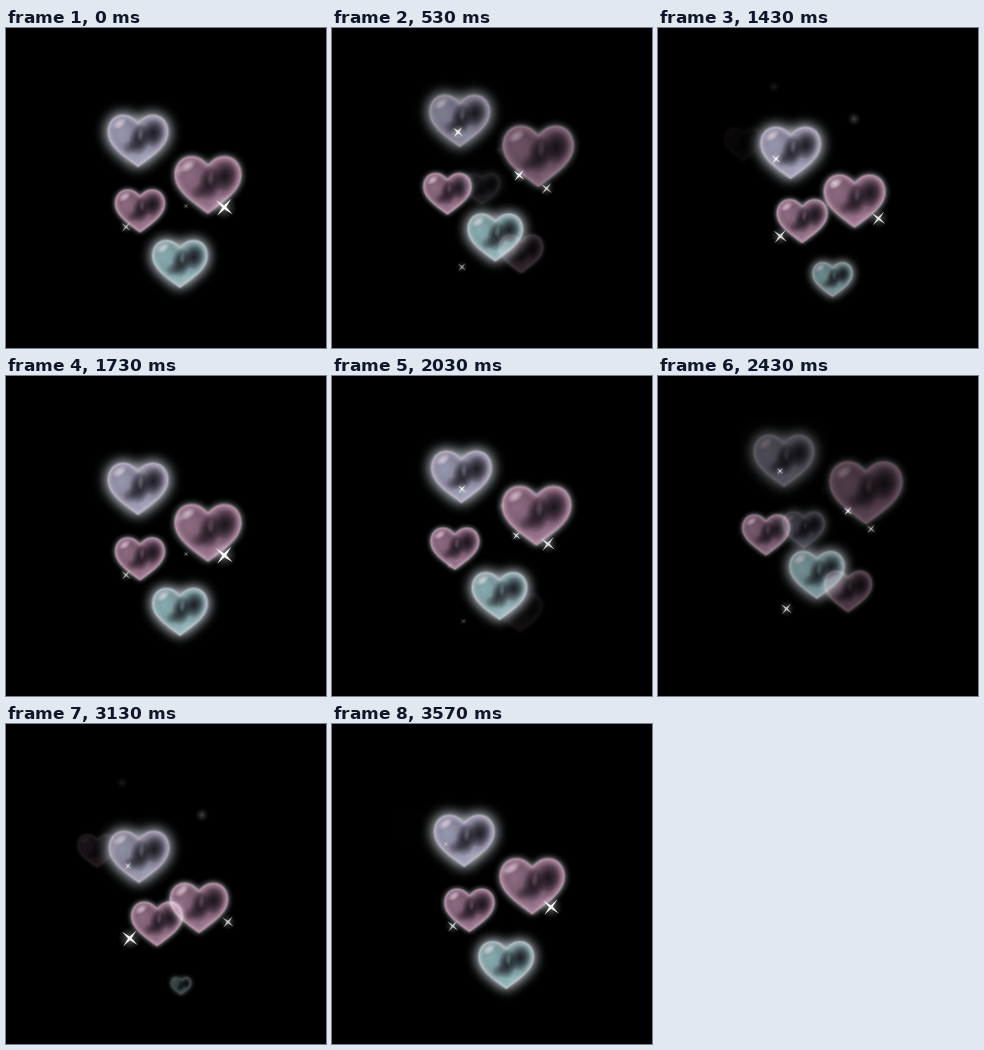
These frames come from a looping animation (320x320 px, 3.63 s). An HTML page with a canvas:

```html
<!DOCTYPE html>
<html>
<head>
<meta charset="utf-8">
<title>Floating hearts</title>
<style>
html, body { margin: 0; width: 100%; height: 100%; overflow: hidden; background: #000; }
canvas { display: block; }
</style>
</head>
<body>
<canvas id="stage" width="320" height="320"></canvas>
<script>
const ctx = document.getElementById('stage').getContext('2d');
const LOOP = 3630, CYCLE = 18, UNIT = 120, SPRITE = 200;
const clamp = (v, lo, hi) => Math.max(lo, Math.min(hi, v));
const rgba = (rgb, a) => `rgba(${rgb},${a})`;

// Unit heart: one wide, centred on the origin, mirrored from its right half.
const half = new Path2D('M0 -.29 C.07 -.39 .17 -.44 .27 -.43 C.41 -.42 .5 -.3 .5 -.15 C.5 .1 .2 .27 0 .43');
const heart = new Path2D(half);
heart.addPath(half, new DOMMatrix().scale(-1, 1));

function makeHeart({ body, shine, rim, glow, spread }) {
  const canvas = document.createElement('canvas');
  canvas.width = canvas.height = SPRITE;
  const g = canvas.getContext('2d');
  g.translate(SPRITE / 2, SPRITE / 2);
  g.scale(UNIT, UNIT);

  const patch = (x, y, rx, ry, turn, rgb, alpha) => {
    g.save();
    g.translate(x, y);
    g.rotate(turn);
    g.scale(rx, ry);
    const fade = g.createRadialGradient(0, 0, 0, 0, 0, 1);
    fade.addColorStop(0, rgba(rgb, alpha));
    fade.addColorStop(.45, rgba(rgb, alpha * .7));
    fade.addColorStop(1, rgba(rgb, 0));
    g.fillStyle = fade;
    g.fillRect(-1, -1, 2, 2);
    g.restore();
  };

  // Each half closes along the axis, so even-odd and nonzero fills agree.
  g.shadowColor = rgba('205,215,222', glow);
  g.shadowBlur = spread;
  g.fillStyle = '#000';
  g.fill(heart);
  g.fill(heart);
  g.shadowBlur = 0;

  const dark = '12,10,15';
  g.save();
  g.clip(heart);
  g.fillStyle = rgba(body, 1);
  g.fillRect(-1, -1, 2, 2);
  patch(-.28, -.12, .25, .3, .2, shine, .4);
  patch(.06, .25, .32, .2, -.3, shine, .55);
  patch(.02, -.02, .18, .28, .15, dark, .8);
  patch(.25, -.13, .2, .24, .35, dark, .85);
  patch(-.13, .1, .13, .12, 0, dark, .35);
  patch(.04, -.1, .06, .13, .1, shine, .3);
  patch(-.31, -.29, .14, .08, -.6, '255,235,245', .6);
  g.filter = 'blur(4px)';
  g.lineWidth = .09;
  g.strokeStyle = rgba(rim, .6);
  g.stroke(heart);
  g.restore();

  g.filter = 'blur(1.5px)';
  g.lineWidth = .022;
  g.strokeStyle = rgba(rim, .65);
  g.stroke(heart);
  return canvas;
}

const lilac = makeHeart({ body: '124,121,142', shine: '190,196,220', rim: '215,204,222', glow: .8, spread: 28 });
const pink = makeHeart({ body: '112,82,102', shine: '182,142,168', rim: '218,180,202', glow: .5, spread: 14 });
const teal = makeHeart({ body: '112,142,147', shine: '172,214,218', rim: '214,220,224', glow: .8, spread: 28 });

// Interpolates points of [phase, ...values], extending the end segments.
function along(points, phase) {
  let i = 1;
  while (i < points.length - 1 && phase > points[i][0]) i++;
  const a = points[i - 1], b = points[i];
  const k = (phase - a[0]) / (b[0] - a[0]);
  return a.slice(1).map((v, j) => v + (b[j + 1] - v) * k);
}

function eachCopy(phase, draw) {
  for (let copy = -1; copy <= 1; copy++) draw(phase + copy * CYCLE);
}

function drawHeart({ sprite, path, sizes, born, gone, ease = 1 }, phase) {
  const rise = clamp((phase - born[0]) / (born[1] - born[0]), 0, 1);
  const fall = clamp((gone[1] - phase) / (gone[1] - gone[0]), 0, 1) ** ease;
  if (rise * fall === 0) return;
  const [x, y] = along(path, phase);
  const [width] = along(sizes, clamp(phase, sizes[0][0], sizes.at(-1)[0]));
  const size = width * SPRITE / UNIT;
  ctx.globalAlpha = rise * fall;
  ctx.drawImage(sprite, x - size / 2, y - size / 2, size, size);
}

const bigPink = {
  sprite: pink, born: [-16, -6], gone: [3, 12],
  path: [[-13, 189, 226], [-5, 193, 184], [0, 202, 157], [7, 208, 117]],
  sizes: [[-13, 44], [0, 66], [7, 72]]
};
const bigLilac = {
  sprite: lilac, born: [-15, -4.5], gone: [4, 10],
  path: [[-13, 150, 161], [-5, 133, 133], [0, 132, 113], [7, 126, 85]],
  sizes: [[-13, 36], [-5, 60]]
};
const smallPink = {
  sprite: pink, born: [-10, -5], gone: [6, 18], ease: 2,
  path: [[-5, 151, 200], [0, 134, 183], [7, 108, 159], [13, 91, 127]],
  sizes: [[-5, 51], [7, 47], [13, 38]]
};
const smallTeal = {
  sprite: teal, born: [-7, -2], gone: [6, 12],
  path: [[-5, 175, 262], [0, 174, 236], [7, 159, 199]],
  sizes: [[-5, 20], [-3, 40], [-1, 55]]
};
const hearts = [bigPink, bigLilac, smallPink, smallTeal];

const sparkles = [
  { path: [[-5, 222, 198], [7, 213, 153]], peak: 0, span: 10, radius: 11 },
  { path: [[0, 180, 178], [7, 190, 135]], peak: 5, span: 6, radius: 7 },
  { path: [[-5, 122, 142], [-3, 118, 131]], peak: -3.5, span: 3, radius: 7 },
  { path: [[3, 130, 113], [7, 122, 95]], peak: 4.5, span: 4.5, radius: 7 },
  { path: [[5, 130, 239], [18, 120, 199]], peak: 12, span: 9.5, radius: 11 }
];

const motes = [
  { path: [[-5, 178, 163], [5, 168, 122]], peak: -3, span: 11, radius: 6, light: .45 },
  { path: [[13, 196, 91], [15, 196, 91]], peak: 14, span: 3, radius: 7, light: .5 },
  { path: [[13, 116, 59], [15, 116, 59]], peak: 14, span: 3, radius: 6, light: .2 }
];

function drawGlow(x, y, radius, alpha) {
  const fade = ctx.createRadialGradient(x, y, 0, x, y, radius);
  fade.addColorStop(0, rgba('190,195,200', alpha));
  fade.addColorStop(.5, rgba('160,165,170', alpha * .45));
  fade.addColorStop(1, rgba('140,145,150', 0));
  ctx.fillStyle = fade;
  ctx.fillRect(x - radius, y - radius, radius * 2, radius * 2);
}

function drawStar(x, y, radius, alpha) {
  drawGlow(x, y, radius * 1.15, alpha * .55);
  ctx.save();
  ctx.translate(x, y);
  ctx.rotate(.7);
  ctx.fillStyle = rgba('255,252,250', alpha);
  ctx.beginPath();
  for (let i = 0; i < 8; i++) {
    const reach = i % 2 ? radius * .18 : radius;
    const angle = i * Math.PI / 4;
    ctx.lineTo(Math.cos(angle) * reach, Math.sin(angle) * reach);
  }
  ctx.fill();
  ctx.restore();
}

function drawLight({ path, peak, span, radius, light }, phase) {
  const power = 1 - Math.abs(phase - peak) / span;
  if (power <= 0) return;
  const [x, y] = along(path, phase);
  if (light) drawGlow(x, y, radius, light * power);
  else drawStar(x, y, radius * (.3 + .7 * power), Math.sqrt(power));
}

function stepAt(time) {
  if (time >= 3470) return time < 3570 ? 34 : 35;
  return clamp(Math.floor((time - 30) / 100), 0, 33);
}

// The first rise runs slightly quicker than the second.
function phaseAt(step) {
  const lead = clamp((step - 6) / 7, 0, 1) - clamp((step - 24) / 6, 0, 1);
  return (step + lead) % CYCLE;
}

function render(now) {
  const phase = phaseAt(stepAt(now % LOOP));
  ctx.globalCompositeOperation = 'source-over';
  ctx.globalAlpha = 1;
  ctx.fillStyle = '#000';
  ctx.fillRect(0, 0, 320, 320);
  ctx.globalCompositeOperation = 'screen';
  ctx.imageSmoothingQuality = 'high';
  for (const item of hearts) eachCopy(phase, p => drawHeart(item, p));
  ctx.globalAlpha = 1;
  for (const item of [...motes, ...sparkles]) eachCopy(phase, p => drawLight(item, p));
}

let start;
function tick(now) {
  start ??= now;
  render(now - start);
  requestAnimationFrame(tick);
}
render(0);
requestAnimationFrame(tick);
</script>
</body>
</html>
```
